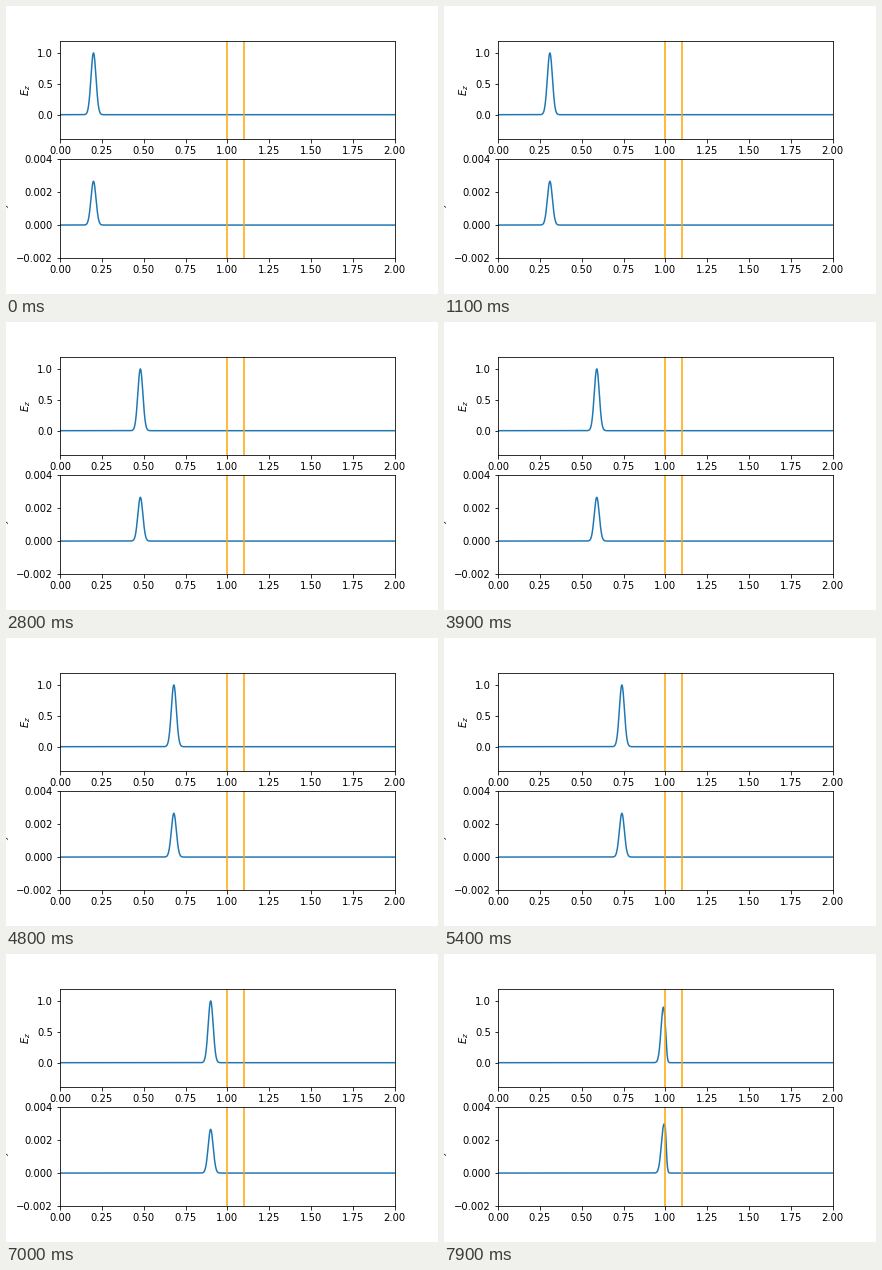
Write a matplotlib script that moves like this. It is 432x288 px and loops after 8 s.

```python
import numpy as np
import matplotlib.pyplot as plt
from matplotlib.animation import FuncAnimation

FRAMES, INTERVAL = 80, 100
START, STEP, SIGMA = 0.2, 0.01, 0.015   # pulse start, travel per frame, width
SLAB = (1.0, 1.1)
EPS = 3.0                               # relative permittivity of the slab
Z0 = 376.73                             # impedance of free space

N = np.sqrt(EPS)
R = (1 - N) / (1 + N)
x = np.linspace(0, 2, 2001)


def pulse(u):
    return np.exp(-u ** 2 / (2 * SIGMA ** 2))


def fields(frame):
    """Incident, reflected and transmitted pulse at the slab's front face."""
    center = START + STEP * frame
    face = SLAB[0]
    incident = pulse(x - center)
    reflected = R * pulse(2 * face - x - center)
    passed = (1 + R) * pulse(face + N * (x - face) - center)
    before = x < face
    ez = np.where(before, incident + reflected, passed)
    hy = np.where(before, incident - reflected, N * passed) / Z0
    return ez, hy


def make_axes(index, label, ylim, ticks):
    ax = fig.add_subplot(2, 1, index)
    line, = ax.plot(x, np.zeros_like(x), color="C0", lw=1.5)
    for edge in SLAB:
        ax.axvline(edge, color="orange", lw=1.5)
    ax.set_xlim(0, 2)
    ax.set_xticks(np.arange(0, 2.01, 0.25))
    ax.set_ylim(*ylim)
    ax.set_yticks(ticks)
    ax.set_ylabel(label)
    return line


fig = plt.figure(figsize=(6, 4), dpi=72, facecolor="white")
fig.subplots_adjust(left=0.125, right=0.9, bottom=0.125, top=0.88, hspace=0.2)
lines = (
    make_axes(1, "$E_z$", (-0.4, 1.2), [0, 0.5, 1]),
    make_axes(2, "$H_y$", (-0.002, 0.004), [-0.002, 0, 0.002, 0.004]),
)


def update(frame):
    for line, values in zip(lines, fields(frame)):
        line.set_ydata(values)
    return lines


anim = FuncAnimation(fig, update, frames=FRAMES, interval=INTERVAL,
                     repeat=True, repeat_delay=0, blit=False)
plt.show()
```
